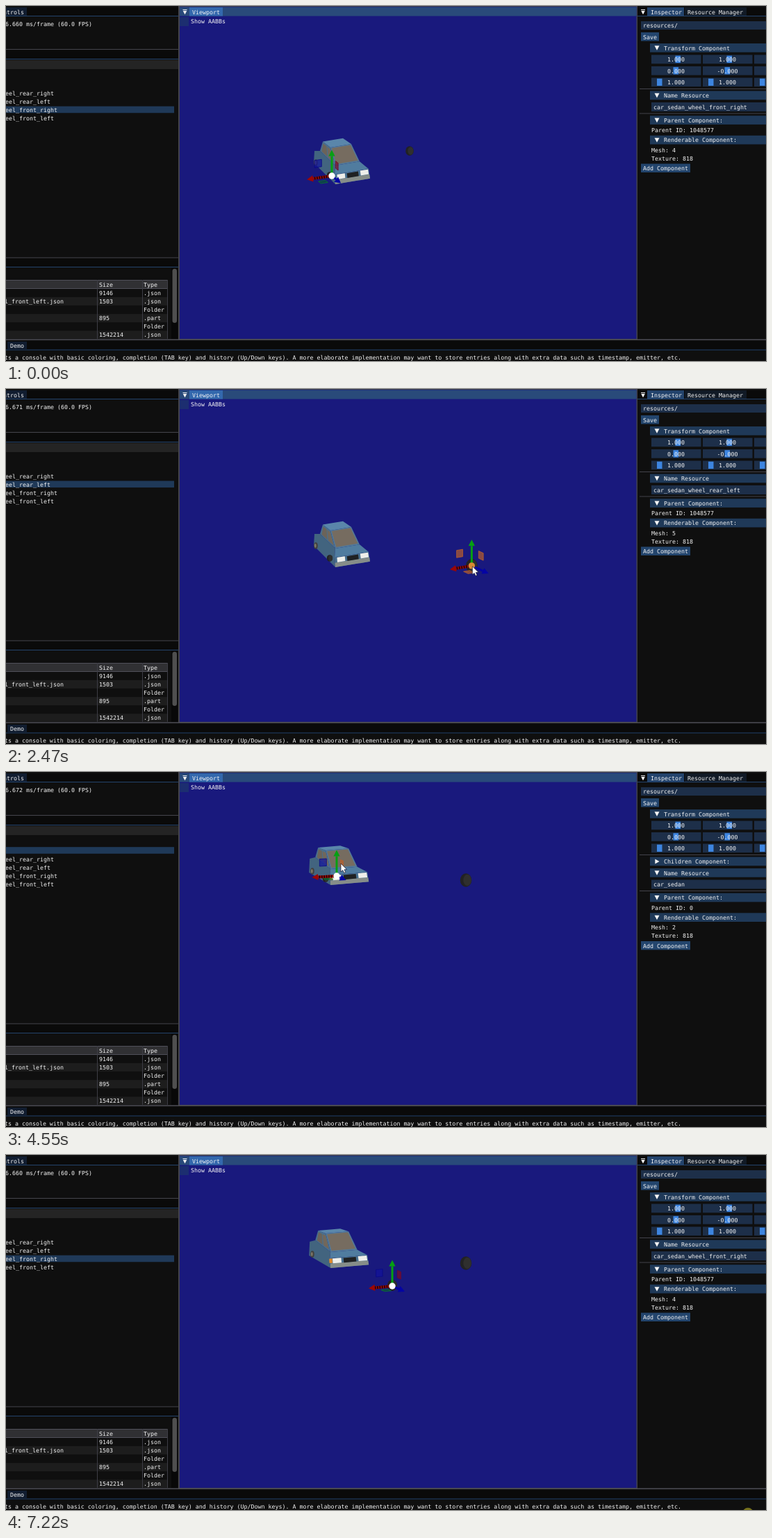
An HTML page for the animation above (7.29 s loop, 1094 by 512 pixels).

```html
<!DOCTYPE html>
<html lang="en">
<head>
<meta charset="utf-8">
<title>Scene editor</title>
<style>
html, body { margin: 0; width: 100%; height: 100%; overflow: hidden; background: #0f0f0f; }
svg { display: block; width: 1094px; height: 512px; }
text { font: 8.3px "DejaVu Sans Mono", monospace; fill: #f4f4f4; text-rendering: geometricPrecision; white-space: pre; }
</style>
</head>
<body>
<svg id="stage" viewBox="0 0 1094 512">
  <g id="ui"></g>
  <g id="list"></g>
  <g id="inspector"></g>
  <g id="scene"></g>
  <g id="pointer"></g>
</svg>
<script>
const LOOP = 7290;
const $ = id => document.getElementById(id);
const FRAME = '#1d2f49', HEADER = '#1f3958', BUTTON = '#23456d', TAB = '#23436c', DIM_TAB = '#111d30', LINE = '#43434b';

// Drawing helpers; text is placed by its vertical middle.
const rect = (x, y, x2, y2, fill) => `<rect x="${x}" y="${y}" width="${x2 - x}" height="${y2 - y}" fill="${fill}"/>`;
const text = (x, y, s, anchor = 'start') => `<text x="${x}" y="${y + 3}" text-anchor="${anchor}">${s}</text>`;
const poly = (pts, fill, extra = '') => `<polygon points="${pts.map(p => p.map(v => v.toFixed(2))).join(' ')}" fill="${fill}" ${extra}/>`;
const oval = (x, y, rx, ry, fill, extra = '') => `<ellipse cx="${x}" cy="${y}" rx="${rx}" ry="${ry}" fill="${fill}" ${extra}/>`;
const arrowDown = (x, y, r = 3.5) => poly([[x - r, y - r * .9], [x + r, y - r * .9], [x, y + r]], '#f4f4f4');
const arrowRight = (x, y) => poly([[x - 2.7, y - 3.5], [x - 2.7, y + 3.5], [x + 3.5, y]], '#f4f4f4');
const menuIcon = x => rect(x - 3, 5, x + 3, 6, '#f4f4f4') + arrowDown(x, 9.4, 2.8);
const titleBar = (x, y, x2) => rect(x, y, x2, y + 13, '#0a0a0a') + rect(x, y + 12, x2, y + 13, TAB);

function fileTable() {
  const rows = [['', '9146', '.json'], ['car_sedan_wheel_front_left.json', '1503', '.json'], ['', '', 'Folder'],
    ['', '895', '.part'], ['', '', 'Folder'], ['', '1542214', '.json']];
  let s = rect(0, 395, 232, 408, '#4f4f59') + rect(0, 396, 232, 407, '#303033');
  s += text(134, 401.5, 'Size') + text(198, 401.5, 'Type');
  rows.forEach(([name, size, type], i) => {
    const y = 413.7 + i * 12.15;
    if (i % 2) s += rect(0, y - 6, 232, Math.min(y + 6, 480), '#1d1d1d');
    s += text(83, y, name, 'end') + text(134, y, size) + text(198, y, type);
  });
  for (const x of [131, 196, 232]) s += rect(x, 395, x + 1, 480, '#3d3d45');
  return s;
}

function sliders() {
  let s = '';
  [['1.000', '1.000', 34.5], ['0.000', '-0.000', 31.5], ['1.000', '1.000', 8]].forEach(([a, b, grab], r) => {
    const y = 70.5 + r * 16.5;
    [a, b, ''].forEach((v, c) => {
      const x = 929 + c * 74;
      s += rect(x, y, x + 71.5, y + 12.7, FRAME);
      if (c < 2 || r > 1) s += rect(x + grab, y + 1.2, x + grab + 7.5, y + 11.5, '#3d85e0');
      s += text(x + 35.5, y + 6.5, v, 'middle');
    });
  });
  return s;
}

function buildUi() {
  let s = '';
  // left column
  s += titleBar(0, 2, 248) + rect(0, 2, 30, 14, DIM_TAB) + text(26, 8.5, 'Controls', 'end');
  s += rect(0, 62, 248, 63, LINE) + titleBar(0, 64, 248) + rect(0, 78, 248, 91, '#242424');
  s += rect(0, 362.5, 248, 363.5, LINE) + titleBar(0, 364, 248);
  s += rect(238, 378, 247, 481, '#080808') + '<rect x="239.5" y="379" width="6.5" height="78" rx="3.2" fill="#4f4f4f"/>';
  s += fileTable();

  // viewport
  s += rect(248, 0, 909, 481, LINE) + rect(250, 1, 907.5, 480, '#19197d');
  s += rect(250, 1.5, 907.5, 14.5, '#294a7a') + rect(264, 2, 312, 14.5, '#3368ad');
  s += menuIcon(257.5) + text(268, 8.5, 'Viewport');
  s += rect(250, 16, 263, 29, '#1c2e70') + text(266, 22, 'Show AABBs');

  // console
  s += rect(0, 480.5, 1094, 482, '#4c4c54') + titleBar(0, 483.5, 1094) + rect(2, 484, 30, 495.5, DIM_TAB) + text(6, 489.5, 'Demo');
  s += text(972, 506.5, 'ts a console with basic coloring, completion (TAB key) and history (Up/Down keys). A more elaborate implementation may want to store entries along with extra data such as timestamp, emitter, etc.', 'end');

  // inspector, fixed part
  s += titleBar(909, 2, 1094) + rect(923, 2, 976, 15, TAB) + rect(977, 2, 1066, 14, '#111a26');
  s += menuIcon(917) + text(928, 8.5, 'Inspector') + text(981, 8.5, 'Resource Manager');
  s += rect(914, 22, 1094, 34, FRAME) + text(917, 28, 'resources/');
  s += rect(914, 38, 940, 50.5, BUTTON) + text(917, 44.5, 'Save');
  s += header(60.5, 'Transform Component') + sliders() + rect(912, 119, 1094, 120, LINE);
  $('ui').innerHTML = s;
}

const header = (y, s, icon = arrowDown) => rect(927, y - 6.5, 1094, y + 6.2, HEADER) + icon(937, y) + text(947, y, s);

function inspector(part) {
  const d = part.children ? 16.5 : 0;
  let s = d ? header(129, 'Children Component:', arrowRight) : '';
  s += header(129 + d, 'Name Resource') + rect(929, 139 + d, 1094, 152 + d, FRAME) + text(932, 145.5 + d, part.name);
  s += rect(912, 154.5 + d, 1094, 155.5 + d, LINE);
  s += header(164.7 + d, 'Parent Component:') + text(929, 179 + d, 'Parent ID: ' + part.parent);
  s += header(193.3 + d, 'Renderable Component:') + text(929, 207.7 + d, 'Mesh: ' + part.mesh) + text(929, 219.8 + d, 'Texture: 818');
  return s + rect(914, 227.5 + d, 985, 240 + d, BUTTON) + text(917, 234 + d, 'Add Component');
}

const WHEELS = ['rear_right', 'rear_left', 'front_right', 'front_left'];
function list(row, t) {
  const y = 113 + row * 12.15, ms = Math.round(667 - 7 * Math.cos(t / LOOP * 2 * Math.PI));
  let s = rect(0, y - 4.8, 242, y + 4.8, HEADER);
  WHEELS.forEach((w, i) => s += text(-61 + 5 * (16 + w.length), 125.5 + i * 12.1, 'car_sedan_wheel_' + w, 'end'));
  return s + text(124, 26, `16.${ms} ms/frame (60.0 FPS)`, 'end');
}

const wheelPart = (n, mesh) => ({ row: n + 1, name: 'car_sedan_wheel_' + WHEELS[n], parent: 1048577, mesh });
const FRONT = wheelPart(2, 4), REAR = wheelPart(1, 5);
const CAR = { row: 0, name: 'car_sedan', parent: 0, mesh: 2, children: true };
const selectedAt = t => t < 1450 ? FRONT : t < 3400 ? REAR : t < 5130 ? CAR : FRONT;

// Motion
const mix = (a, b, k) => a.map((v, i) => v + (b[i] - v) * k);
function ease(t, from, to) {
  const k = Math.min(1, Math.max(0, (t - from) / (to - from)));
  return k * k * (3 - 2 * k);
}
const overshoot = k => 1 + 5 * (k - 1) ** 3 + 4 * (k - 1) ** 2;

const pullAt = t => overshoot(ease(t, 1800, 2800));
const liftAt = t => ease(t, 3750, 4380);
const dropAt = t => ease(t, 5430, 5900);

const rearPos = t => mix(mix([581, 209], [657, 248], pullAt(t)), [662, 156], liftAt(t));
const carPos = t => mix([481, 236], [476, 150], liftAt(t));
const frontPos = t => mix(mix([469, 245], [463, 155], liftAt(t)), [556, 189], dropAt(t));

// Each leg: start, end, x, y to reach.
const legs = [
  [60, 1050, 582, 210], [1800, 2800, 658, 249], [2800, 3100, 486, 231], [3750, 4380, 481, 145], [4380, 4550, 482, 132],
  [4650, 5000, 462, 163], [5430, 5900, 560, 186], [5900, 6060, 685, 185], [6130, 6950, 1068, 517]
];
function cursorPos(t) {
  if (t > 1800 && t < 2800) return rearPos(t).map(v => v + 1);
  return legs.reduce((p, [from, to, ...goal]) => mix(p, goal, ease(t, from, to)), [972, 485]);
}

// Near side of the body: x, y, width across, and how far forward it lies.
const profile = {
  deck: [444, 209, 0, 0], sill: [443, 226, 0, -.3], pillar: [452, 209, 0, .2],
  roofBack: [456, 195.5, 29, .25], roofFront: [467, 204, 30, .7],
  cowl: [474, 230, 35, .6], noseTop: [473, 243, 49, 1], noseBottom: [474, 257, 50, 1]
};

function car(t) {
  const lift = liftAt(t);
  const near = (name, side = 0) => {
    const [x, y, width, ahead] = profile[name], w = width * side;
    return [x + w + lift * (.1 * w - 6.8), y - .165 * w + lift * (.07 * w - 84 - 10 * ahead)];
  };
  const far = name => near(name, 1);
  const across = (a, b) => [near(a), far(a), far(b), near(b)];
  // Patch of a four-cornered face in its own 0..1 coordinates.
  const patch = ([a, b, c, d], u0, v0, u1, v1, fill) => {
    const on = (u, v) => mix(mix(a, b, u), mix(d, c, u), v);
    return poly([on(u0, v0), on(u1, v0), on(u1, v1), on(u0, v1)], fill);
  };
  const side = ['deck', 'pillar', 'cowl', 'noseTop', 'noseBottom', 'sill'].map(n => near(n));
  const cabin = ['roofBack', 'roofFront', 'cowl', 'pillar'].map(n => near(n));
  const glass = across('roofFront', 'cowl'), nose = across('noseTop', 'noseBottom');
  const hub = mix([446, 226], [441, 143], lift);
  return poly(side, '#42647f')
    + oval(...hub, 2.8, 4.8, '#42413e') + oval(hub[0] - .7, hub[1], 1.4, 3, '#7d7869')
    + poly(cabin, '#4a6f8c') + patch(cabin, .1, .14, .48, .9, '#6b6359') + patch(cabin, .55, .14, .92, .9, '#71675b')
    + poly(glass, '#537998') + patch(glass, .05, .05, .95, .93, '#766c60')
    + poly(across('roofBack', 'roofFront'), '#5a86aa') + poly(across('cowl', 'noseTop'), '#507c9f')
    + poly(nose, '#486f8e') + patch(nose, 0, .56, 1, 1, '#868d89')
    + patch(nose, .07, .04, .3, .54, '#eeeeea') + patch(nose, .75, .04, .98, .54, '#eeeeea')
    + patch(nose, .36, .08, .69, .56, '#1f2123')
    + (lift > .5 ? patch(nose, -.02, .04, .06, .5, '#e08a2c') : '');
}

const wheel = ([x, y], r) => oval(x, y, r, r * 1.16, '#222223') + oval(x + r * .25, y, r * .7, r, '#2f2f2e');

function gizmo(t, part) {
  const [cx, cy] = (part === REAR ? rearPos : part === CAR ? carPos : frontPos)(t);
  // Axes lean with the place on screen, as perspective does.
  const dx = cx - 465, dy = cy - 150;
  const X = [-36 + dx * .022, 2 + dy * .033], Y = [0, -37.5], Z = [13 + dx * .055, 6 + dy * .05];
  const hot = (t > 1800 && t < 2800) || (t > 3680 && t < 4380);
  const hotRed = hot || (t >= 4380 && t < 4720);
  const plane = (a, b, fill, line) => poly([[-1, -1], [1, -1], [1, 1], [-1, 1]].map(([i, j]) =>
    [0, 1].map(n => [cx, cy][n] + a[n] * (.55 + i * .14) + b[n] * (.55 + j * .14))),
    fill, `fill-opacity=".7" stroke="${line}" stroke-width=".8"`);
  const axis = (v, fill, width, dash) => {
    const n = Math.hypot(...v), [ux, uy] = v.map(c => c / n), tip = [cx + v[0], cy + v[1]];
    const base = [tip[0] - ux * 9, tip[1] - uy * 9];
    const line = (c, extra) => `<line x1="${cx}" y1="${cy}" x2="${base[0]}" y2="${base[1]}" stroke="${c}" stroke-width="${width}" ${extra}/>`;
    return line(fill, '') + (dash ? line('#1a0508', 'stroke-dasharray="1.6 1.8"') : '')
      + poly([tip, [base[0] - uy * 4.6, base[1] + ux * 4.6], [base[0] + uy * 4.6, base[1] - ux * 4.6]], fill);
  };
  const orange = '#b9602c';
  return plane(X, Y, hot ? orange : '#12129c', hot ? orange : '#0b0b86')
    + plane(Y, Z, hotRed ? orange : '#7d0c28', hotRed ? orange : '#700a2a')
    + plane(X, Z, hot ? orange : '#0c4a3c', hot ? orange : '#0a7a2c')
    + axis(Z, '#0404a4', 3) + axis(X, '#9c0606', 4, true) + axis(Y, '#06a012', 3)
    + oval(cx, cy, 4.7, 4.7, hot ? '#d88a34' : '#ffffff');
}

function pointer(t) {
  if (t < 60) return '';
  if (t > 7150) return oval(1068, 517, 8.2, 8.2, '#75701c');
  const [x, y] = cursorPos(t);
  const halo = t > 1800 && t < 2000 ? oval(x - 1, y - 1, 8.7, 8.7, '#c9a024', 'fill-opacity=".9"') : '';
  const shape = [[0, 0], [0, 12], [2.8, 9.6], [4.7, 13.6], [6.8, 12.7], [5, 8.8], [8.6, 8.5]];
  return halo + poly(shape.map(p => [x + p[0], y + p[1]]), '#fff', 'stroke="#15152e" stroke-width=".7"');
}

let shownPart = null;
function draw(t) {
  const part = selectedAt(t);
  if (part !== shownPart) $('inspector').innerHTML = inspector(shownPart = part);
  $('list').innerHTML = list(part.row, t);
  const [fx, fy] = frontPos(t);
  $('scene').innerHTML = wheel(rearPos(t), 5.8 + 2.2 * pullAt(t) + .3 * liftAt(t)) + car(t)
    + wheel([fx - 3 * (1 - dropAt(t)), fy - 1], 4.2 + 2.8 * dropAt(t)) + gizmo(t, part);
  $('pointer').innerHTML = pointer(t);
}

buildUi();
draw(0);
const start = performance.now();
requestAnimationFrame(function tick() {
  draw((performance.now() - start) % LOOP);
  requestAnimationFrame(tick);
});
</script>
</body>
</html>
```
